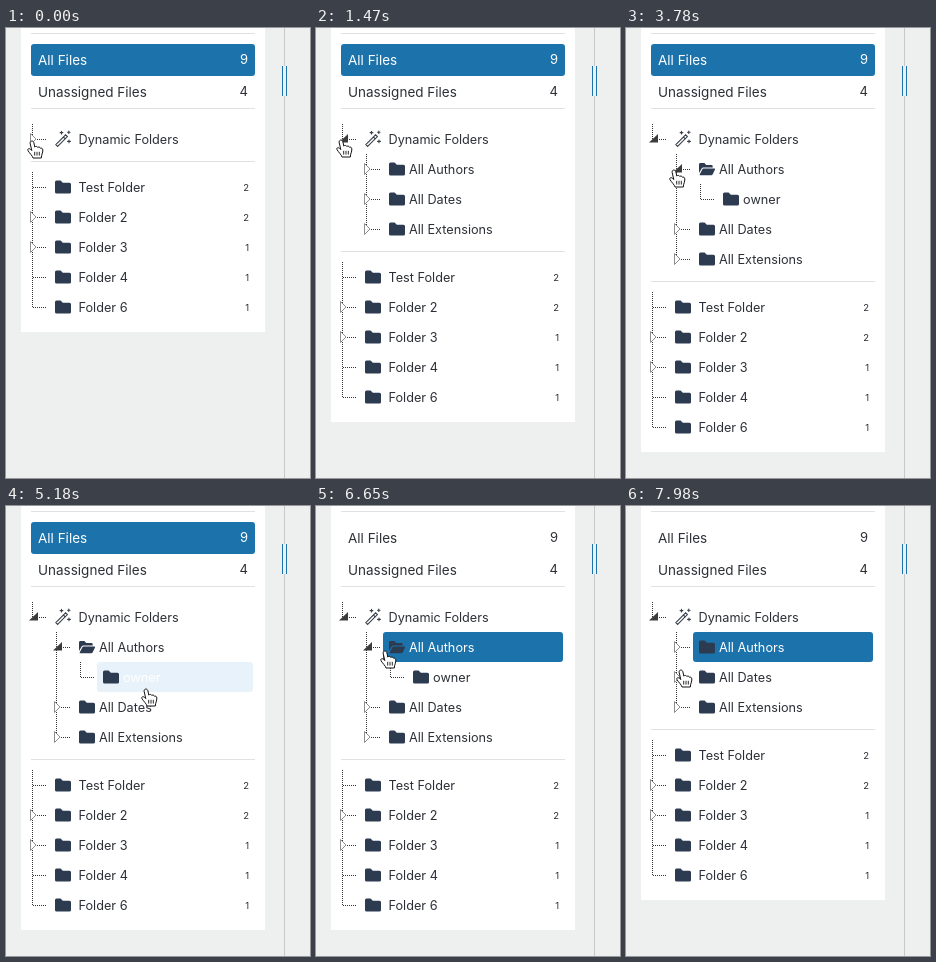
Write an HTML page that moves like this. It is 304 px wide and 450 px high and loops after 8 s.

```html
<!DOCTYPE html>
<html lang="en">
<head>
<meta charset="utf-8">
<title>Folder tree</title>
<style>
html, body { margin: 0; width: 100%; height: 100%; overflow: hidden; background: #eef0f0; }
svg { display: block; width: 304px; height: 450px; }
text { font: 12.7px Inter, Roboto, sans-serif; fill: #2c3036; }
.big { font-size: 13.5px; }
.count { font-size: 9.5px; text-anchor: end; }
.big.count { font-size: 13px; }
.on { fill: #fff; }
.rule { stroke: #dfe1e3; }
.dots { stroke: #333; stroke-dasharray: 1 1; fill: none; }
.bar { fill: #1c72ab; }
.hover { fill: #e8f2fa; }
</style>
</head>
<body>
<svg viewBox="0 0 304 450">
  <defs>
    <clipPath id="kidsClip"><rect id="kidsBox" x="15" y="126" width="244"/></clipPath>
    <clipPath id="subClip"><rect id="subBox" x="67" y="156" width="190"/></clipPath>
    <path id="folder" d="M0 2Q0 .5 1.5 .5H5.6L7.8 2.7H14.5Q16 2.7 16 4.2V12Q16 13.5 14.5 13.5H1.5Q0 13.5 0 12Z" fill="#2c3b50"/>
    <path id="folderOpen" d="M0 11V2.4Q0 1 1.4 1H5.4L7.2 2.9H12.4Q13.7 2.9 13.7 4.2V5.4H4.2Q3.3 5.4 2.8 6.2ZM4.2 6.6H15.5Q16.4 6.7 16 7.6L13.6 12.4Q13.1 13.2 12.3 13.2H1.2Q.3 13.1 .8 12.2L3.4 7.2Q3.7 6.6 4.2 6.6Z" fill="#2c3b50"/>
    <path id="closed" d="M-1.5 -5.5L4 0L-1.5 5.5Z" fill="#fff" stroke="#8d8d8d"/>
    <path id="opened" d="M6 -5V3.5H-3Z" fill="#3c3c3c"/>
  </defs>
  <rect id="panel" x="15" width="244" fill="#fff"/>
  <path d="M278.5 0V450" stroke="#c6c9cb"/>
  <rect x="276" y="38" width="5" height="30" fill="#eef0f0"/>
  <path d="M276.5 38V68M280.5 38V68" stroke="#1c72ab"/>
  <path class="rule" d="M25 5.5H249M25 80.5H249"/>
  <rect id="filesBar" class="bar" x="25" y="16" width="224" height="32" rx="3"/>
  <g id="files"><text class="big" x="32" y="37">All Files</text><text class="big count" x="242" y="35.5">9</text></g>
  <text class="big" x="32" y="69">Unassigned Files</text><text class="big count" x="242" y="67.5">4</text>

  <path class="dots" d="M26.5 96V112M27 111.5H40"/>
  <g id="rootArrow"></g>
  <g fill="none" stroke="#3a414b" stroke-width="1.1" stroke-linecap="round">
    <path d="M49.8 116.6L59.6 106.8L61.4 108.6L51.6 118.4ZM57.4 109L59.2 110.8"/>
    <path d="M55.5 103.2V106M54.1 104.6H56.9M62.8 103V105.4M61.6 104.2H64M63 112V114.8M61.6 113.4H64.4"/>
  </g>
  <text x="72.5" y="116">Dynamic Folders</text>

  <g id="kids" clip-path="url(#kidsClip)">
    <path id="kidLine" class="dots"/>
    <rect id="authorsHover" class="hover" x="67" y="126" width="180" height="30" rx="3"/>
    <rect id="authorsBar" class="bar" x="67" y="126" width="180" height="30" rx="3"/>
    <path class="dots" d="M51 141.5H64"/>
    <g id="authorsArrow"></g>
    <use id="authorsIcon" x="73" y="134"/>
    <g id="authors"><text x="93" y="146">All Authors</text></g>
    <g clip-path="url(#subClip)">
      <path class="dots" d="M74.5 156V172M75 171.5H88"/>
      <rect id="userHover" class="hover" x="91" y="156" width="156" height="30" rx="3"/>
      <rect id="userBar" class="bar" x="91" y="156" width="156" height="30" rx="3"/>
      <use href="#folder" x="97" y="164"/>
      <g id="user"><text x="117" y="176">owner</text></g>
    </g>
    <g id="rest"></g>
  </g>
  <g id="lower"><path class="rule" d="M25 133.5H249"/><path class="dots" d="M26.5 144V280"/></g>
  <g id="hand" stroke="#111" stroke-linecap="round" stroke-linejoin="round">
    <path fill="#fff" d="M-1.9 1.8C-1.9 -.6 1.4 -.6 1.9 1.8L2.8 6.1C3.4 5 5.4 5.2 5.8 6.5C6.5 5.7 8.1 6 8.5 7.3C9.3 6.7 10.8 7.3 10.8 8.9C11 12 9.4 13.6 9.3 17H1C.6 14.9 -2.4 12.3 -4 9.7C-4.9 8 -3 6.9 -1.5 8.3L-.5 9.3Z"/>
    <path fill="none" stroke-width=".9" d="M2.7 11.2V14.2M5 11.2V14.2M7.3 11.2V14.2"/>
  </g>
</svg>
<script>
const LOOP = 8000, TICK = 70;
const $ = id => document.getElementById(id);
const set = (id, key, value) => $(id).setAttribute(key, value);
const use = (name, x, y) => `<use href="#${name}" x="${x}" y="${y}"/>`;

// One tree row: connector, optional arrow, icon, label and count
function row(x, y, label, arrow, count = "") {
  return `<path class="dots" d="M${x + 1} ${y + .5}H${x + 14}"/>` +
    (arrow ? use("closed", x, y) : "") +
    use("folder", x + 23, y - 7) +
    `<text x="${x + (count ? 46.5 : 43)}" y="${y + 5}">${label}</text>` +
    `<text class="count" x="243" y="${y + 4}">${count}</text>`;
}

$("rest").innerHTML = row(50, 171, "All Dates", true) + row(50, 201, "All Extensions", true);
$("lower").insertAdjacentHTML("beforeend", [
  ["Test Folder", false, 2], ["Folder 2", true, 2], ["Folder 3", true, 1],
  ["Folder 4", false, 1], ["Folder 6", false, 1]
].map(([label, arrow, count], i) => row(26, 159 + i * 30, label, arrow, count)).join(""));
$("rootArrow").innerHTML = use("closed", 26, 111) + use("opened", 26, 111);
$("authorsArrow").innerHTML = use("closed", 50, 141) + use("opened", 50, 141);

// Pointer tip: time, x, y
const path = [
  [0, 26, 113], [420, 25, 112], [1750, 25, 112], [2310, 47, 141], [2520, 47, 141],
  [2800, 48, 142], [4270, 48, 142], [4970, 140, 183], [5600, 140, 183],
  [5950, 131, 152], [6090, 130, 148], [6300, 130, 147], [6650, 69, 145],
  [6930, 52, 141], [7490, 52, 141], [7910, 55, 164], [8000, 55, 164]
];

const swing = k => .5 - Math.cos(Math.PI * k) / 2;
const ramp = (t, from, length) => swing(Math.min(1, Math.max(0, (t - from) / length)));

function pointer(t) {
  const i = path.findIndex(p => p[0] > t);
  const [a, x, y] = path[i - 1], [b, u, v] = path[i];
  const k = swing((t - a) / (b - a));
  return [x + (u - x) * k, y + (v - y) * k];
}

function arrow(id, open) {
  const [shut, down] = $(id).children;
  shut.style.display = open ? "none" : "";
  down.style.display = open ? "" : "none";
}

function light(id, on) {
  for (const el of $(id).children) el.classList.toggle("on", on);
}

function draw(t) {
  const kids = 90 * ramp(t, 140, 210);
  const sub = 30 * (ramp(t, 2940, 210) - ramp(t, 7280, 210));
  const grow = kids + sub;
  const subOpen = t >= 2940 && t < 7280;

  set("panel", "height", 304 + grow);
  set("kidsBox", "height", grow);
  set("subBox", "height", sub);
  set("kidLine", "d", `M50.5 126V${202 + sub}`);
  set("rest", "transform", `translate(0 ${sub})`);
  set("lower", "transform", `translate(0 ${grow})`);
  arrow("rootArrow", t >= 140);
  arrow("authorsArrow", subOpen);
  set("authorsIcon", "href", subOpen ? "#folderOpen" : "#folder");

  const pickUser = ramp(t, 5180, 210), pickAuthors = ramp(t, 6230, 140);
  set("filesBar", "opacity", 1 - ramp(t, 5180, 140));
  set("userBar", "opacity", pickUser - pickAuthors);
  set("authorsBar", "opacity", pickAuthors);
  set("userHover", "opacity", ramp(t, 4690, 140) - ramp(t, 5880, 70));
  set("authorsHover", "opacity", ramp(t, 5950, 140));
  light("files", t < 5250);
  light("user", t >= 5180 && t < 6230);
  light("authors", t >= 6230);

  const [x, y] = pointer(t);
  set("hand", "transform", `translate(${x} ${y})`);
}

const start = performance.now();
function frame() {
  const t = (performance.now() - start) % LOOP;
  draw(Math.floor(t / TICK) * TICK);
  requestAnimationFrame(frame);
}
frame();
</script>
</body>
</html>
```
